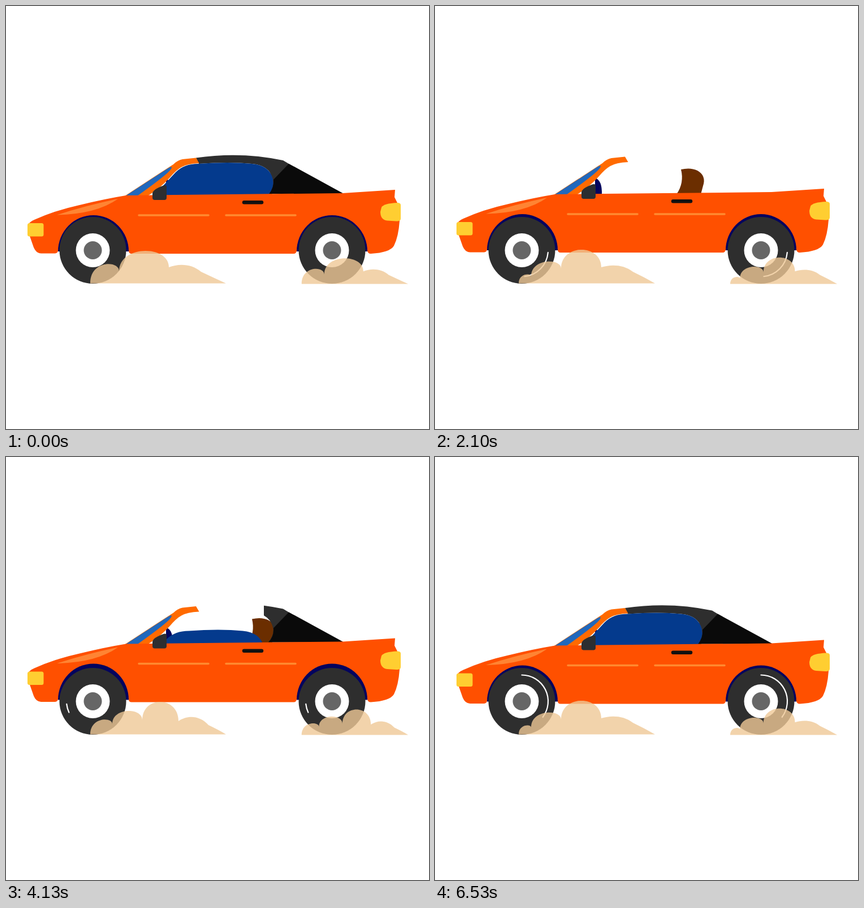
An HTML page for the animation above (6560 ms loop, 748 by 748 pixels).

```html
<!DOCTYPE html>
<html lang="en">
<head>
<meta charset="utf-8">
<title>Convertible</title>
<style>
html, body { margin: 0; width: 100%; height: 100%; overflow: hidden; background: #fff; }
svg { display: block; width: 100vw; height: 100vh; }
</style>
</head>
<body>
<svg viewBox="0 0 748 748">
  <defs>
    <clipPath id="wipe"><path id="edge"/></clipPath>
    <g id="wheel">
      <circle r="59" fill="#2e2e2e"/>
      <circle r="30" fill="#fff"/>
      <circle r="16" fill="#666"/>
      <path id="glint" fill="none" stroke="#fff" stroke-width="2.2" stroke-linecap="round"/>
    </g>
    <path id="dust" fill="#efc897" fill-opacity=".8"/>
    <path id="arch" d="M-62.5 1A62.5 64 0 0 1 62.5 1Z" fill="#03045e"/>
  </defs>

  <g id="car">
    <path d="M283 306Q296 310 295 336H283Z" fill="#03045e"/>
    <path d="M435 291Q452 287 464 293Q480 302 474 320L470 335H427Q441 315 435 291Z" fill="#6b2e00"/>
    <g clip-path="url(#wipe)">
      <path d="M336 268.5Q415 257 490 273L500 279 597 332H464Q475 318 472 306Q466 282 435 279Q395 275 341 279Z" fill="#2e2e2e"/>
      <path d="M500 279L597 332H464Q474 322 473 307Z" fill="#0a0a0a"/>
    </g>
    <path id="glass" d="M262 335Q285 310 300 294Q315 279 340 279Q395 275 435 279Q466 282 472 306Q475 320 464 334Z" fill="#043a8d"/>
    <path d="M210 336L296 280Q303 273 312 271L336 268.5 341.5 278Q320 279 310 285Q301 290 290 303Q272 323 250 336Z" fill="#ff6a00"/>
    <path d="M211 336L288 286Q295 282 292 288Q288 296 232 336Z" fill="#2068bc"/>
    <path d="M38 390Q40 382 50 378Q85 362 130 352Q175 341 212 335L300 334 595 331 688 325 687 338 693 350 696 380Q694 408 686 424Q679 436 645 438Q640 438 639 433H514Q513 438 509 438H222Q217 438 217 433H92Q91 437 87 437.500H62Q53 437 49 427L42 407Z" fill="#ff5000"/>
    <path d="M90 369.500Q140 353 198 341Q160 368 90 369.500Z" fill="#ff8433"/>
    <path d="M235 370H358M389 370H512" stroke="#ff8a30" stroke-width="3.500" stroke-linecap="round"/>
    <path d="M421 347.300H452" stroke="#111" stroke-width="6.500" stroke-linecap="round"/>
    <path d="M263 343Q259 343 259 339V331Q260 326 268 322Q278 317 281 317Q284 317 284 320V339Q284 343 280 343Z" fill="#2c2e31"/>
    <rect x="38" y="384" width="28.500" height="23.500" rx="3.500" fill="#ffce31"/>
    <path d="M664 356Q668 349 692 348Q698 348 698 352V376Q698 381 690 380.500L674 379.500Q662 378 662 364Z" fill="#ffce31"/>
    <use href="#arch" x="154.500" y="433"/>
    <use href="#arch" x="576.500" y="433"/>
  </g>
  <use href="#wheel" x="153.500" y="432"/>
  <use href="#wheel" x="576.500" y="432"/>
  <use href="#dust"/>
  <use href="#dust" transform="translate(405.800 106.500) scale(.785)"/>
</svg>
<script>
const LOOP = 6560;
// Start times of the ten steps in each 700 ms beat
const STEPS = [0, 100, 170, 230, 300, 370, 430, 500, 570, 630];

// Each key is [step, ...values]
const BOB = [[0, 0], [8, 270], [20, 665], [39, 1333], [59, 2053], [74, 2575], [93, 3185]];
const GLINT = [[0, 180, 0], [8, -11.5, 153], [20, -407, 26], [39, -746.5, 127],
  [59, -1185.5, 19], [74, -1475, 20], [93, -1736.5, 127]];
const ROOF = [[0, 330], [8, 495], [15, 650], [51, 650], [59, 456], [64, 330]];
const GLASS = [[0, 0], [8, 51], [10, 62], [54, 62], [59, 33], [64, 0]];

// Dust values: left x, four lumps as (right x, right y, top), softness of the last lump
const FULL = [148, 170, 478, 475, 223, 464, 452, 294, 462, 431, 350, 470, 459, .3];
const DUST = [
  [0, 149, 149, 490, 490, 200, 469, 457, 288, 462, 433, 345, 470, 458, .3],
  [2, ...FULL],
  [3, ...FULL],
  [5, 149, 188, 472, 465, 241, 465, 449, 305, 467, 433, 358, 474, 460, .3],
  [8, 150, 181, 474, 471, 241, 465, 451, 299, 464, 446, 355, 474, 451, 0]
];

const $ = id => document.getElementById(id);
const rad = deg => deg * Math.PI / 180;

function at(keys, n) {
  const i = keys.findIndex(k => k[0] >= n);
  if (i < 0) return keys[keys.length - 1].slice(1);
  if (i === 0) return keys[0].slice(1);
  const a = keys[i - 1], b = keys[i], u = (n - a[0]) / (b[0] - a[0]);
  return a.map((v, j) => v + (b[j] - v) * u).slice(1);
}

function dustPath(v) {
  let x = v[0], y = 490.5, d = `M${x} ${y}`;
  for (let i = 1; i < 13; i += 3) {
    const [nx, ny, top] = v.slice(i, i + 3);
    const c = (top - (y + ny) / 8) / .75;
    const soft = i === 10 ? v[13] * (nx - x) : 0;
    d += `C${x + soft} ${c} ${nx - soft} ${c} ${nx} ${ny}`;
    [x, y] = [nx, ny];
  }
  return d + `Q${x + 19} ${y + 9} 389 490.5Z`;
}

function arcPath(mid, len) {
  if (len < 1) return "";
  const point = a => `${46.5 * Math.sin(rad(a))} ${-46.5 * Math.cos(rad(a))}`;
  return `M${point(mid - len / 2)}A46.5 46.5 0 0 1 ${point(mid + len / 2)}`;
}

function draw(now) {
  const t = now % LOOP, r = t % 700;
  const n = Math.floor(t / 700) * 10 + STEPS.filter(s => s <= r).length - 1;

  const bob = 3.5 * (Math.cos(rad(at(BOB, n)[0])) - 1);
  $("car").setAttribute("transform", `translate(0 ${bob})`);

  const [top] = at(ROOF, n);
  const low = top - Math.min(48, Math.max(0, (top - 456) * 1.23));
  $("edge").setAttribute("d", `M${top} 255H700V335H${low}Z`);

  const [sink] = at(GLASS, n);
  $("glass").setAttribute("transform", `translate(${-sink / 2} ${sink})`);

  $("glint").setAttribute("d", arcPath(...at(GLINT, n)));
  $("dust").setAttribute("d", dustPath(at(DUST, n % 9)));
}

const start = performance.now();
function tick() {
  draw(performance.now() - start);
  requestAnimationFrame(tick);
}
tick();
</script>
</body>
</html>
```
